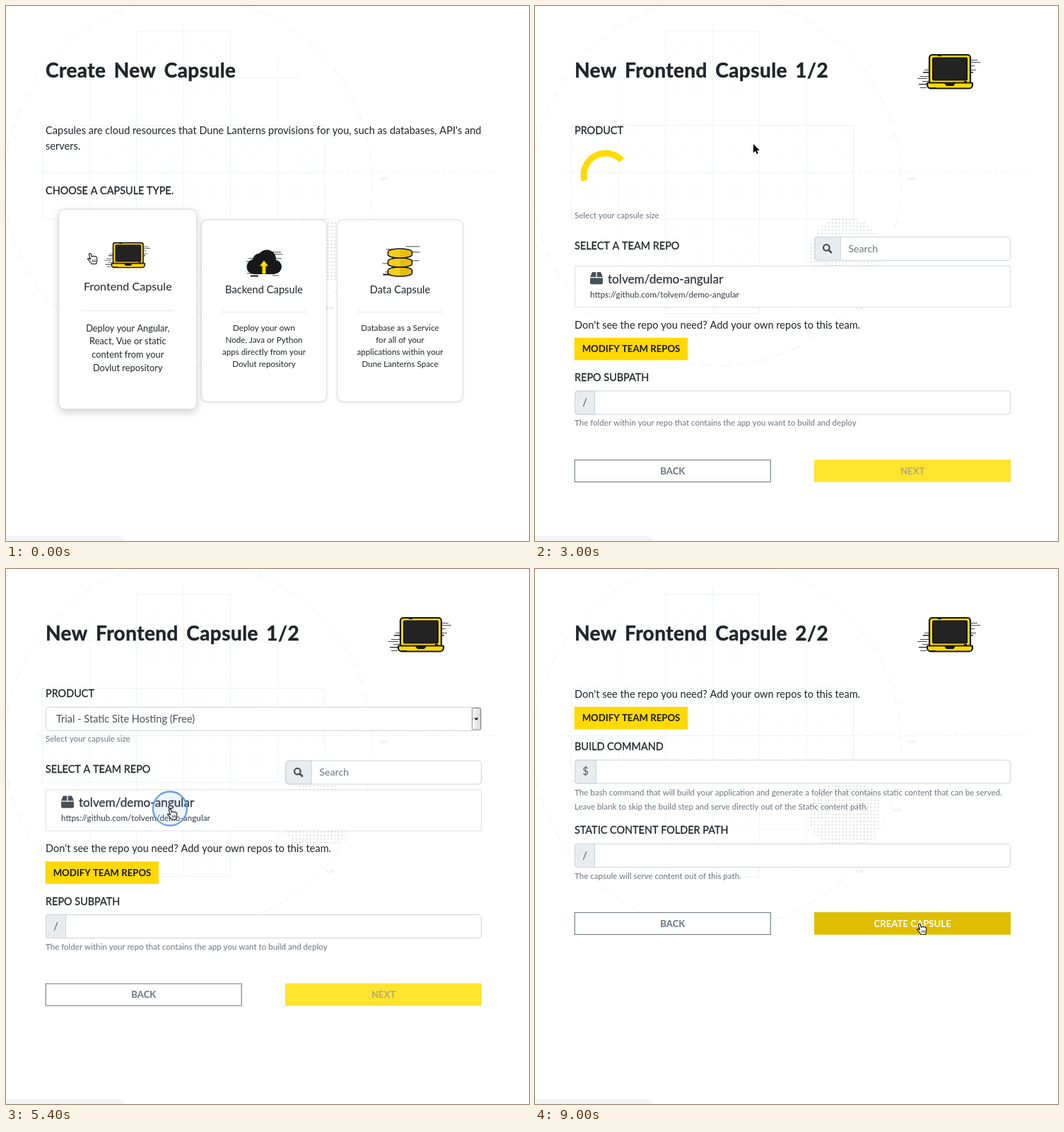
An HTML page with a canvas for the animation above (9400 ms loop, 740 by 756 pixels).

```html
<!DOCTYPE html>
<html lang="en">
<head>
<meta charset="utf-8">
<title>Create New Capsule</title>
<style>
html, body { margin: 0; width: 100%; height: 100%; overflow: hidden; background: #fff; }
canvas { display: block; width: 740px; height: 756px; }
</style>
</head>
<body>
<canvas id="stage"></canvas>
<script>
const W = 740, H = 756, LOOP = 9400, STEP = 200;
const INK = '#212529', MUTED = '#6c757d', LINE = '#ced4da', FILL = '#e9ecef';
const YELLOW = '#ffd900', GOLD = '#dfbe00', BLUE = '#007bff', BLACK = '#17181a';
const BODY = 14.57, SMALL = 11.56, LEFT = 56;
const canvas = document.getElementById('stage');
const ratio = window.devicePixelRatio || 1;
canvas.width = W * ratio;
canvas.height = H * ratio;
const c = canvas.getContext('2d');

// y is the middle of the capitals
function text(s, x, y, o = {}) {
  const size = o.size || BODY;
  c.font = `${o.weight || 400} ${size}px Lato, "Open Sans", sans-serif`;
  c.letterSpacing = (o.ls || 0) + 'px';
  c.wordSpacing = (o.ws || 0) + 'px';
  c.textAlign = o.align || 'left';
  c.textBaseline = 'alphabetic';
  c.fillStyle = c.strokeStyle = o.color || INK;
  c.fillText(s, x, y + size * 0.36);
  if (o.thick) {
    c.lineWidth = o.thick;
    c.lineJoin = 'round';
    c.strokeText(s, x, y + size * 0.36);
  }
}
const title = s => text(s, LEFT, 91, { size: 28, weight: 700, ls: 0.45, ws: 4, thick: 0.5 });
const label = (s, y) => text(s, LEFT, y, { size: 14.45, thick: 0.3 });
const help = (s, y) => text(s, LEFT, y, { size: SMALL, color: MUTED });

function box(x, y, w, h, r, fill, stroke, lw = 1) {
  c.beginPath();
  c.roundRect(x, y, w, h, r);
  if (fill) { c.fillStyle = fill; c.fill(); }
  if (stroke) { c.strokeStyle = stroke; c.lineWidth = lw; c.stroke(); }
}
function line(x1, y1, x2, y2, color, lw = 1) {
  c.beginPath();
  c.moveTo(x1, y1);
  c.lineTo(x2, y2);
  c.strokeStyle = color;
  c.lineWidth = lw;
  c.stroke();
}
function poly(pts, fill, stroke, lw) {
  c.beginPath();
  pts.forEach(p => c.lineTo(p[0], p[1]));
  c.closePath();
  c.lineJoin = 'round';
  if (stroke) { c.strokeStyle = stroke; c.lineWidth = lw; c.stroke(); }
  if (fill) { c.fillStyle = fill; c.fill(); }
}
function at(x, y, s, draw) {
  c.save();
  c.translate(x, y);
  c.scale(s, s);
  draw();
  c.restore();
}
const streaks = rows => rows.forEach(([x, y, w, h = 0.8]) => {
  c.fillStyle = BLACK;
  c.fillRect(x, y, w, h);
});

function backdrop(k) {
  at(0, 0, k, () => {
    c.fillStyle = '#f5f7f7';
    for (let x = 56; x < 450; x += 7)
      for (let y = 42; y < 434; y += 7) {
        const wide = y > 168 && y < 301, tall = x > 184 && x < 318;
        if (wide || tall) c.fillRect(x, y, 1, 1);
      }
    const pale = '#eff3f3';
    box(51.5, 168.5, 399, 133, 0, null, pale);
    box(184.5, 35.5, 133, 399, 0, null, pale);
    for (const x of [184.5, 251.5, 317.5]) line(x, 168, x, 301, pale);
    line(251.5, 25, 251.5, 434, '#f2f5f5');
    for (const x of [118.5, 384.5]) line(x, 72, x, 395, '#f5f7f7');
    line(90, 101.5, 415, 101.5, '#f2f5f5');
    line(90, 368.5, 415, 368.5, '#f5f7f7');
    line(42, 235.5, 450, 235.5, pale);
    c.setLineDash([4, 4]);
    line(450, 235.5, 695, 235.5, '#eff2f2');
    c.setLineDash([15, 11]);
    c.beginPath();
    c.arc(258, 248, 260, 0, 7);
    c.strokeStyle = '#f0f3f3';
    c.stroke();
    c.setLineDash([]);
    c.fillStyle = '#b9bdbf';
    for (let x = 390; x <= 490; x += 5)
      for (let y = 301; y <= 390; y += 5)
        if (Math.hypot(x - 439, y - 348) < 51) c.fillRect(x, y, 1.2, 1.2);
    for (const [x, y] of [[534, 244], [512, 340], [459, 427]])
      text('</>', x, y, { size: 7, color: '#c4c8ca', align: 'center' });
  });
}

function laptop(x, y, s) {
  at(x, y, s, () => {
    streaks([[28, 8, 11], [28, 11, 15], [28, 16, 7], [30, 22, 7], [28, 25, 5, 1.5],
      [-36, 22, 8], [-38, 25, 9, 1.5], [-42, 31, 13], [-46, 34, 14], [-39, 38, 9], [-44, 42, 11, 1.2], [-42, 47, 9]]);
    box(-29, 1, 58, 41, 4, YELLOW, BLACK, 2.2);
    box(-24, 5.5, 48, 31, 1, '#232324', BLACK, 2);
    box(-32, 40.5, 64, 8, [1, 1, 5, 5], YELLOW, BLACK, 2.2);
    poly([[-8, 41], [8, 41], [5, 45], [-5, 45]], BLACK);
    streaks([[-17, 0, 5, 3], [-29, 47, 9, 2], [20, 38, 4, 3]]);
  });
}
function cloud(x, y) {
  at(x, y, 1, () => {
    streaks([[6, 3, 18], [14, 6, 12], [17, 12, 8], [-25, 16, 10], [-22, 12, 7], [-19, 36, 11, 2], [12, 36, 9], [-24, 33, 9]]);
    c.fillStyle = BLACK;
    for (const [a, b, r] of [[-14, 24, 10.5], [-6, 15, 10], [4, 13, 13], [15, 24, 10]]) {
      c.beginPath();
      c.arc(a, b, r, 0, 7);
      c.fill();
    }
    c.fillRect(-14, 18, 29, 16.5);
    poly([[0, 15], [6, 23], [2.5, 23], [2.5, 34], [-2.5, 34], [-2.5, 23], [-6, 23]], YELLOW);
  });
}
function disks(x, y) {
  at(x, y, 1, () => {
    streaks([[8, -3, 20], [-20, 1, 12], [14, 5, 14], [-25, 21, 9], [16, 17, 11], [-24, 36, 11, 2], [-21, 33, 8]]);
    for (const d of [27, 14, 1]) {
      c.beginPath();
      c.ellipse(0, d + 4, 17, 4.5, 0, Math.PI, 0);
      c.lineTo(17, d + 8);
      c.ellipse(0, d + 8, 17, 4.5, 0, 0, Math.PI);
      c.closePath();
      c.fillStyle = '#e5bd12';
      c.fill();
      c.save();
      c.clip();
      c.fillStyle = '#f6cf1d';
      c.fillRect(-17, d - 2, 17, 17);
      c.restore();
      c.strokeStyle = BLACK;
      c.lineWidth = 1.6;
      c.stroke();
    }
  });
}

// origin is the centre of the card
function card(x, y, s, icon, name, rows) {
  at(x, y, s, () => {
    c.shadowColor = s > 1 ? 'rgba(0,0,0,.2)' : 'rgba(0,0,0,.14)';
    c.shadowBlur = (s > 1 ? 12 : 4) * ratio;
    c.shadowOffsetY = (s > 1 ? 4 : 1) * ratio;
    box(-88.7, -128.5, 177.4, 257, 8, '#fff');
    c.shadowColor = 'transparent';
    box(-88.7, -128.5, 177.4, 257, 8, null, '#dcdcdc');
    icon();
    text(name, 0, -29.5, { size: 14.7, align: 'center' });
    line(-59.5, 2, 59.5, 2, '#e3e3e3');
    rows.forEach((r, i) => text(r, 0, 24 + i * 17.1, { size: 11.65, align: 'center' }));
  });
}
function chooser() {
  title('Create New Capsule');
  text('Capsules are cloud resources that Dune Lanterns provisions for you, such as databases, API\'s and', LEFT, 176);
  text('servers.', LEFT, 198);
  label('CHOOSE A CAPSULE TYPE.', 261);
  card(365, 430.5, 1, () => cloud(0, -86), 'Backend Capsule',
    ['Deploy your own', 'Node, Java or Python', 'apps directly from your', 'Dovlut repository']);
  card(557.5, 430.5, 1, () => disks(0, -88), 'Data Capsule',
    ['Database as a Service', 'for all of your', 'applications within your', 'Dune Lanterns Space']);
  card(172.3, 428.5, 1.1, () => laptop(0.5, -86, 0.667), 'Frontend Capsule',
    ['Deploy your Angular,', 'React, Vue or static', 'content from your', 'Dovlut repository']);
}

function field(x, y, right, lead) {
  box(x + 0.5, y + 0.5, right - x - 1, 33, 4, '#fff');
  box(x + 0.5, y + 0.5, lead, 33, [4, 0, 0, 4], FILL, LINE);
  box(x + 0.5, y + 0.5, right - x - 1, 33, 4, null, LINE);
}
function prefixed(sign, y, right, lead = 28) {
  field(LEFT, y, right, lead);
  text(sign, LEFT + lead / 2 + 0.5, y + 16.5, { align: 'center', color: '#495057' });
}
function search(x, y, right) {
  field(x, y, right, 36.5);
  c.beginPath();
  c.arc(x + 17, y + 15.5, 4.3, 0, 7);
  c.strokeStyle = '#495057';
  c.lineWidth = 2.3;
  c.stroke();
  line(x + 20, y + 18.5, x + 24.5, y + 23, '#495057', 2.8);
  text('Search', x + 48, y + 16.5, { size: 14.2, color: MUTED });
}
function button(s, x, y, w, fill, color, edge) {
  if (edge) box(x + 0.2, y + 0.2, w - 0.6, 31, 0, fill, edge, 1.1);
  else box(x - 0.3, y - 0.3, w + 0.4, 31.8, 0, fill);
  text(s, x + w / 2, y + 15.5, { size: 13.2, weight: 700, color, align: 'center' });
}
function modify(y) {
  text('Don\'t see the repo you need? Add your own repos to this team.', LEFT, y);
  button('MODIFY TEAM REPOS', LEFT, y + 18.5, 160, YELLOW, BLACK);
}
function actions(y, right, s, fill, color, halo) {
  const w = right - LEFT, x = LEFT + w * 0.55;
  button('BACK', LEFT, y, w * 0.45, '#fff', MUTED, MUTED);
  if (halo) box(x - 1.5, y - 1.5, w * 0.45 + 3, 35, 1, null, '#ffe64d', 3);
  button(s, x, y, w * 0.45, fill, color);
}

function spinner(x, y, t) {
  const deg = Math.PI / 180, u = t - 1600;
  const head = -53 + u * 370 / 1400;
  const span = 201 + 49 * Math.cos(u * Math.PI * 3 / 1400);
  c.beginPath();
  c.arc(x, y, 31, (head - span) * deg, head * deg);
  c.strokeStyle = '#ffdb00';
  c.lineWidth = 9;
  c.stroke();
}
function crate(x, y, color) {
  poly([[x + 3, y], [x + 8.3, y], [x + 8.3, y + 7], [x, y + 7]], color);
  poly([[x + 9.7, y], [x + 15, y], [x + 18, y + 7], [x + 9.7, y + 7]], color);
  box(x, y + 8.3, 18, 9, [0, 0, 2, 2], color);
}
function branchIcon(x, y, color) {
  for (const [a, b] of [[3, 3], [3, 14], [11, 5]]) {
    c.beginPath();
    c.arc(x + a, y + b, 2, 0, 7);
    c.strokeStyle = color;
    c.lineWidth = 1.7;
    c.stroke();
  }
  line(x + 3, y + 5, x + 3, y + 12, color, 1.8);
  c.beginPath();
  c.moveTo(x + 11, y + 7);
  c.quadraticCurveTo(x + 11, y + 10, x + 3, y + 11);
  c.stroke();
}
function repo(y, right, on) {
  const w = right - LEFT, ink = on ? '#fff' : '#343a40';
  box(LEFT + 0.5, y + 0.5, w - 1, 58, 0, on ? BLUE : '#fff', on ? '#3d96f5' : '#dfdfdf');
  crate(78, y + 9, on ? '#fff' : '#495057');
  text('tolvem/demo-angular', 103, y + 18.5, { size: 17.2, color: ink, thick: 0.3 });
  text('https://github.com/tolvem/demo-angular', 78, y + 40.5, { size: 11.75, color: ink });
}
function select(right) {
  box(LEFT + 0.5, 195.5, right - LEFT - 1, 33, 4, '#fff', LINE);
  text('Trial - Static Site Hosting (Free)', 71, 211.5, { color: '#495057' });
  const g = c.createLinearGradient(right - 14, 0, right, 0);
  g.addColorStop(0, '#fafafa');
  g.addColorStop(1, '#d6d6d6');
  box(right - 13.5, 196.5, 12, 30.5, 1, g, '#8c8c8c');
  poly([[right - 10.5, 210.5], [right - 4.5, 210.5], [right - 7.5, 214]], '#111');
}
function menu() {
  c.save();
  c.shadowColor = 'rgba(0,0,0,.35)';
  c.shadowBlur = 10 * ratio;
  c.shadowOffsetY = 3 * ratio;
  box(6, 194, 760, 54, 5, '#ececec');
  c.restore();
  line(LEFT, 193.5, 673, 193.5, '#9cc4ee', 1.5);
  c.fillStyle = '#4a98fc';
  c.fillRect(6, 198, 734, 23);
  c.beginPath();
  c.moveTo(13, 210);
  c.lineTo(15.5, 214);
  c.lineTo(20, 204.5);
  c.strokeStyle = '#fff';
  c.lineWidth = 1.8;
  c.stroke();
  text('Trial - Static Site Hosting (Free)', 25, 209.5, { color: '#fff' });
  text('Standard - Static Site Hosting ($5) Team has exceeded the limit for this product without a payment method.',
    25, 233, { color: '#b2b2b2' });
}

function stepOne(q) {
  const loaded = q >= 3200, picked = q >= 5600, listed = q >= 6600, chosen = q >= 6800;
  const right = picked ? 659.5 : 673, up = loaded ? 55.5 : 0;
  title('New Frontend Capsule 1/2');
  laptop(right - 86, 68, 1);
  label('PRODUCT', 176);
  if (loaded) select(right);
  else spinner(100, 239, q);
  help('Select your capsule size', 295.5 - up);
  label('SELECT A TEAM REPO', 338.5 - up);
  search(LEFT + (right - LEFT) * 0.55, 326 - up, right);
  repo(367 - up, right, picked);
  modify(450.5 - up);
  if (picked && !listed) {
    spinner(358, 504, q - 3200);
    text('Loading Branches', 357.5, 559.5, { size: 17.6, align: 'center', thick: 0.3 });
  }
  if (listed) {
    const ink = chosen ? '#fff' : '#343a40';
    label('SELECT THE BRANCH TO DEPLOY FROM', 479.5);
    search(372, 467, 646);
    box(LEFT + 0.5, 508.5, right - LEFT - 1, 36.5, 4, chosen ? BLUE : '#fff', chosen ? BLUE : '#dfdfdf');
    text('main', 98.5, 526.5, { size: 17, color: ink, thick: 0.3 });
    branchIcon(78, 517, ink);
  }
  const y = listed ? 569.5 : picked ? 601.5 : 525 - up;
  label('REPO SUBPATH', y);
  prefixed('/', y + 18.5, right);
  help('The folder within your repo that contains the app you want to build and deploy', y + 64);
  const hover = q >= 7200;
  actions(y + 116.3, right, 'NEXT', hover ? GOLD : chosen ? YELLOW : '#ffe42e',
    hover ? '#fff' : chosen ? BLACK : '#b3a977', q >= 7400);
  if (q >= 3800 && q < 4800) menu();
}
function stepTwo(q) {
  title('New Frontend Capsule 2/2');
  laptop(587, 68, 1);
  modify(176.5);
  label('BUILD COMMAND', 251);
  prefixed('$', 269.5, 673, 30);
  help('The bash command that will build your application and generate a folder that contains static content that can be served.', 315.5);
  help('Leave blank to skip the build step and serve directly out of the Static content path.', 336);
  label('STATIC CONTENT FOLDER PATH', 369);
  prefixed('/', 388, 673);
  help('The capsule will serve content out of this path.', 433.5);
  const hover = q >= 8800;
  actions(485.3, 673, 'CREATE CAPSULE', hover ? GOLD : YELLOW, hover ? '#fff' : BLACK);
}

// time, x, y of the pointer tip
const path = [[0, 119, 349], [2200, 120, 349], [3000, 309, 195], [3400, 305, 211], [4600, 303, 210],
  [4800, 303, 210], [5200, 232, 338], [5800, 232, 340], [6600, 190, 526], [6800, 190, 526],
  [7200, 465, 706], [7400, 470, 716], [8000, 470, 716], [8800, 544, 502], [9000, 544, 501]];
const clicks = [400, 3600, 4600, 5400, 6800, 7400];

function pointerAt(q) {
  let i = 0;
  while (i < path.length - 2 && path[i + 1][0] <= q) i++;
  const [t0, x0, y0] = path[i], [t1, x1, y1] = path[i + 1];
  const p = Math.min(1, (q - t0) / (t1 - t0)), e = p * p * (3 - 2 * p);
  return [x0 + (x1 - x0) * e, y0 + (y1 - y0) * e];
}
function arrow() {
  poly([[0, 0], [0, 12.5], [2.9, 9.8], [4.8, 14.2], [6.8, 13.3], [4.9, 9.1], [8.8, 9.1]], '#000', '#fff', 1.8);
}
function hand() {
  c.beginPath();
  c.moveTo(0.5, 9);
  c.lineTo(-1.6, 2);
  c.quadraticCurveTo(-1, -0.5, 1, 1);
  c.lineTo(2.6, 5.5);
  c.quadraticCurveTo(4, 3.6, 5.2, 5);
  c.quadraticCurveTo(7, 3.8, 7.6, 5.4);
  c.quadraticCurveTo(9.6, 5, 9.8, 7);
  c.lineTo(9.6, 11.5);
  c.lineTo(8.6, 15.5);
  c.lineTo(2.4, 15.5);
  c.quadraticCurveTo(-0.5, 11.5, -3.4, 8.6);
  c.quadraticCurveTo(-2.8, 6.5, 0.5, 9);
  c.closePath();
  c.fillStyle = '#fff';
  c.strokeStyle = '#111';
  c.lineWidth = 1.1;
  c.lineJoin = 'round';
  c.fill();
  c.stroke();
  for (const x of [3.4, 5.4, 7.4]) line(x, 9.5, x, 13, '#111', 0.8);
}
function pointer(q) {
  if (q >= 6000 && q < 6600) return;
  const [x, y] = pointerAt(q);
  if (clicks.includes(q)) {
    c.beginPath();
    c.arc(x, y, q < 7000 ? 24 : 21, 0, 7);
    c.fillStyle = 'rgba(90,150,220,.1)';
    c.fill();
    c.strokeStyle = q < 7000 ? 'rgba(80,145,225,.85)' : 'rgba(95,145,185,.8)';
    c.lineWidth = 2.3;
    c.stroke();
  }
  const pointing = q < 1000 || (q >= 5200 && q < 5800) || (q >= 6600 && q < 7000) || q >= 8800;
  at(x, y, 1, pointing ? hand : arrow);
}

function draw(q) {
  c.setTransform(ratio, 0, 0, ratio, 0, 0);
  c.fillStyle = '#fff';
  c.fillRect(0, 0, W, H);
  const scroll = q >= 5600 && q < 7800;
  backdrop(scroll ? 0.981 : 1);
  if (q < 1000) chooser();
  else if (q < 7800) stepOne(q);
  else stepTwo(q);
  box(-10, scroll ? 750 : 749, 178, 20, [0, 9, 0, 0], 'rgba(240,240,240,.8)');
  if (scroll) {
    line(731.5, 0, 731.5, H, '#e8e8e8');
    box(735, -6, 9, q < 6600 ? 724 : 768, 3, '#c1c1c1');
  }
  pointer(q);
}

const start = performance.now();
function tick() {
  const t = (performance.now() - start) % LOOP;
  draw(Math.min(Math.floor(t / STEP) * STEP, 9000));
  requestAnimationFrame(tick);
}
tick();
</script>
</body>
</html>
```
